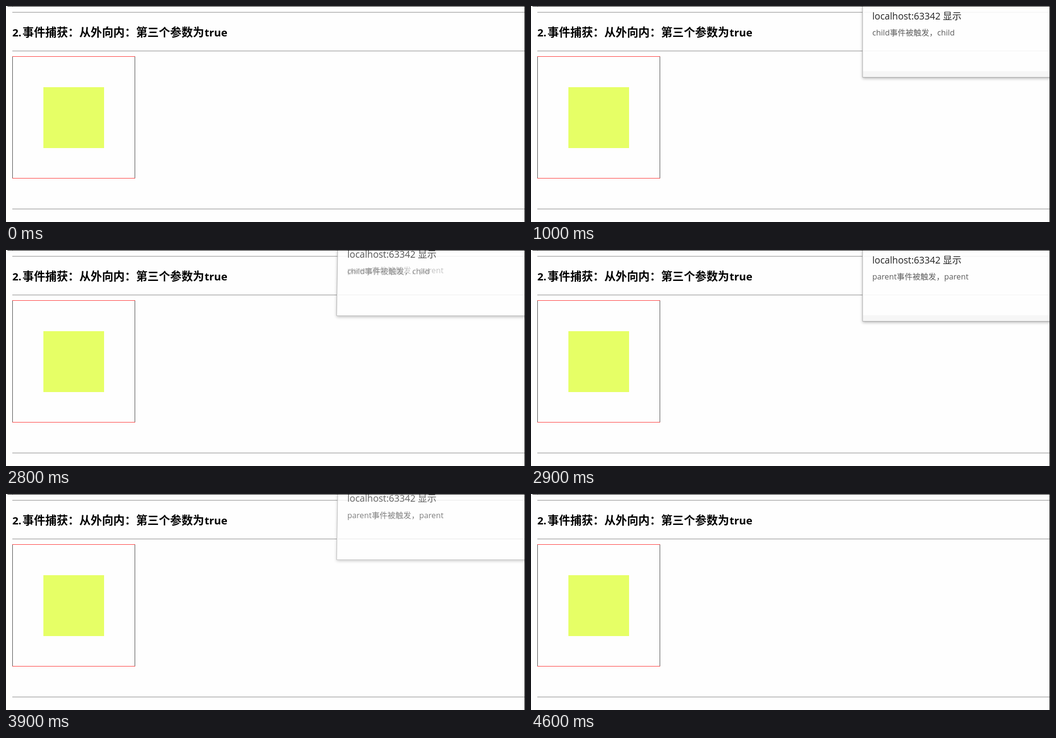
Write an HTML page with a canvas that moves like this. It is 1069 px wide and 447 px high and loops after 5000 ms.

```html
<!DOCTYPE html>
<html lang="zh-CN">
<head>
<meta charset="utf-8">
<title>事件捕获</title>
<style>
  html, body { margin: 0; width: 100%; height: 100%; overflow: hidden; background: #fefefe; }
  canvas { display: block; }
</style>
</head>
<body>
<canvas id="stage" width="1069" height="447"></canvas>
<script>
const W = 1069, H = 447, LOOP = 5000;
const ctx = document.getElementById('stage').getContext('2d');
const FONT = '"Open Sans", "Noto Sans CJK SC", "Noto Sans CJK", sans-serif';
const CHILD = 'child事件被触发，child';
const PARENT = 'parent事件被触发，parent';

// Dialog states; each holds until its end time (ms).
const SETTLED = { left: 683, bottom: 148, lift: 0, title: '#222', text: '#5c5c5c', rule: '#f7f7f7', edge: '#a8a8a8', shadow: 0.3, strip: true };
const MOVING = { left: 681, bottom: 136.5, lift: 11.5, title: '#666', text: '#999', rule: '#e4e4e4', edge: '#c2c2c2', shadow: 0.22 };
const STATES = [
  { end: 900 },
  { end: 1000, box: MOVING, msg: CHILD },
  { end: 2800, box: SETTLED, msg: CHILD },
  { end: 2900, box: { ...MOVING, title: '#555', text: '#888', rule: '#f5f5f5', edge: '#b0b0b0', shadow: 0.28 }, msg: CHILD, ghost: PARENT },
  { end: 3900, box: SETTLED, msg: PARENT },
  { end: 4000, box: { ...MOVING, text: '#808080', rule: '#f1f1f1', edge: '#b8b8b8' }, msg: PARENT },
  { end: LOOP }
];

function rect(color, x, y, w, h) {
  ctx.fillStyle = color;
  ctx.fillRect(x, y, w, h);
}

function label(str, x, y, size, color, weight = 400) {
  ctx.font = `${weight} ${size}px ${FONT}`;
  ctx.fillStyle = color;
  ctx.fillText(str, x, y);
}

function drawPage() {
  rect('#fefefe', 0, 0, W, H);
  rect('#bbb', 13, 1, 1, 1);
  for (const y of [12, 92, 419]) {
    rect('#c4c4c4', 13, y, W - 13, 1);
    rect('#b8b8b8', 13, y + 1, W - 13, 1);
  }
  label('2.', 13, 63, 22, '#000', 700);
  label('事件捕获：从外向内：第三个参数为', 34, 63, 23.4, '#000', 700);
  label('true', 409, 63, 22, '#000', 700);

  rect('#444', 13, 104, 1, 253);
  rect('#444', 265, 104, 1, 253);
  rect('#f33', 13, 104, 253, 1);
  rect('#f33', 13, 356, 253, 1);
  rect('#e6ff66', 77, 168, 125, 126);
}

function drawDialog({ box, msg, ghost }) {
  const { left, bottom, lift } = box;
  const top = lift ? left + 2.5 : left;
  ctx.save();
  ctx.shadowColor = `rgba(0,0,0,${box.shadow})`;
  ctx.shadowBlur = 6;
  ctx.shadowOffsetY = 2;
  ctx.fillStyle = '#fefefe';
  ctx.beginPath();
  ctx.moveTo(top, -20);
  ctx.lineTo(W + 20, -20);
  ctx.lineTo(W + 20, bottom);
  ctx.lineTo(left, bottom);
  ctx.fill();
  ctx.restore();

  ctx.strokeStyle = box.edge;
  ctx.lineWidth = 1;
  ctx.beginPath();
  ctx.moveTo(top, -20);
  ctx.lineTo(left, bottom - 0.5);
  ctx.lineTo(W, bottom - 0.5);
  ctx.stroke();

  // The page rules show faintly through the panel.
  for (const y of [12, 92]) rect(box.rule, left + 3, y, W - left, 2);
  if (box.strip) rect('#f6f6f6', left + 1, 135, W - left, 12);

  label('localhost:63342 显示', 703, 27.5 - lift, 19.2, box.title);
  if (ghost) label(ghost, 703, 47.5, 16.3, '#c4c4c4');
  label(msg, 703, 61 - lift, 16.3, box.text);
}

function frame(now) {
  const t = now % LOOP;
  const state = STATES.find(s => t < s.end);
  drawPage();
  if (state.box) drawDialog(state);
  rect('#000', 3, 0, W - 3, 1);
  rect('#000', W - 1, 0, 1, H);
}

const start = performance.now();
function tick() {
  frame(performance.now() - start);
  requestAnimationFrame(tick);
}
tick();
</script>
</body>
</html>
```
